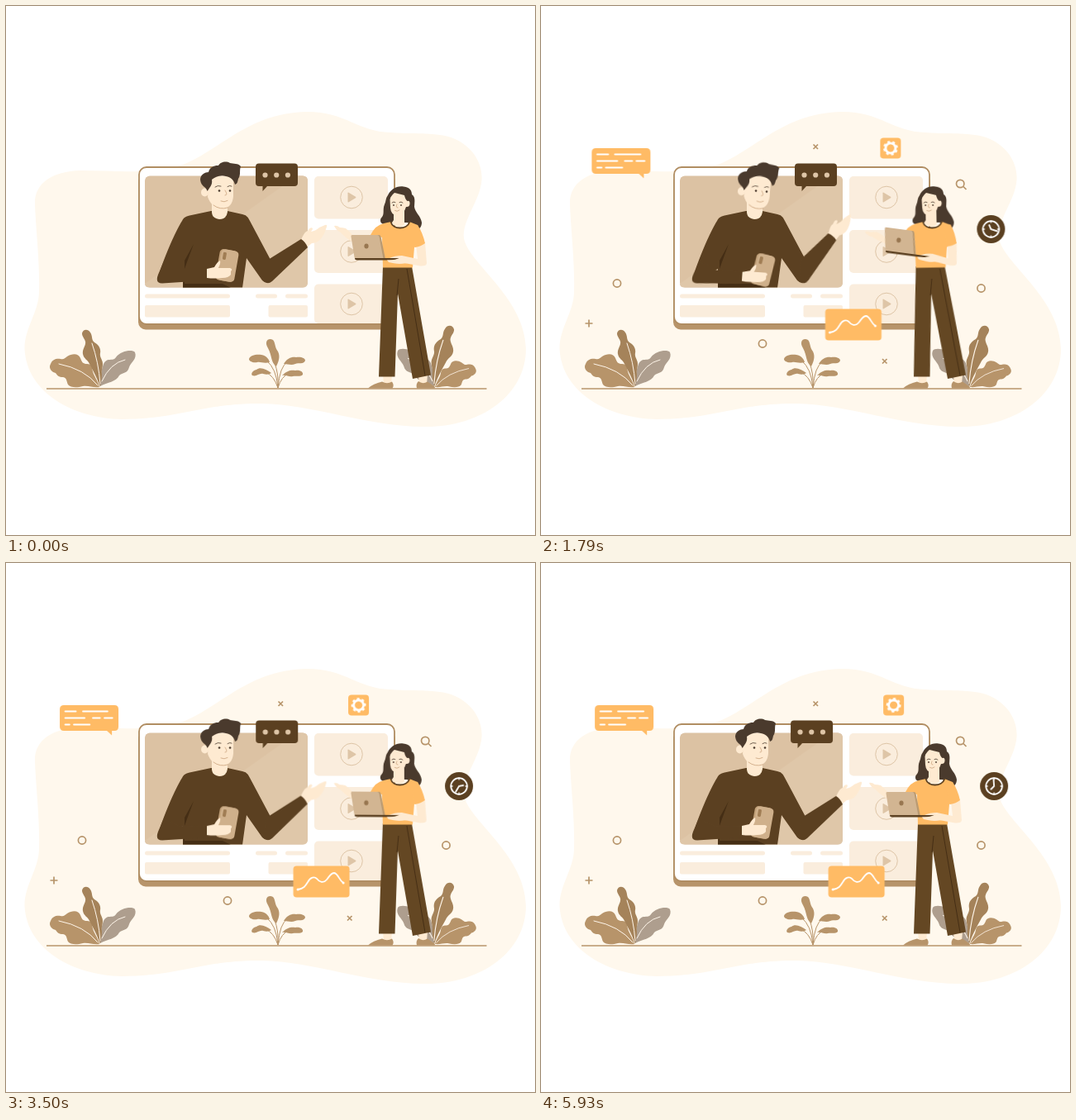
Animation of 640x640 px, one loop 6 s. Source, as an HTML page without scripts:

```html
<!DOCTYPE html>
<html lang="en">
<head>
<meta charset="utf-8">
<title>Video call</title>
<style>
html, body { margin: 0; width: 100%; height: 100%; overflow: hidden; background: #fff; }
svg { display: block; width: 100vw; height: 100vh; }

.dark { fill: #5b4021; }
.shade { fill: #452e15; }
.tan { fill: #b7946a; }
.brown { fill: #a5835a; }
.grey { fill: #ae9e8e; }
.sand { fill: #dec5a7; }
.pale { fill: #faeddd; }
.skin { fill: #feead1; }
.hair { fill: #4a3a2d; }
.orange { fill: #ffbb65; }
.line { fill: none; stroke: #b7946a; stroke-width: 1.7; }
.white { fill: none; stroke: #fff; stroke-width: 1.8; stroke-linecap: round; stroke-linejoin: round; }
.vein { fill: none; stroke: #fff6ea; stroke-width: 1; stroke-linecap: round; }
.face { fill: none; stroke: #4a3a2d; stroke-width: .8; stroke-linecap: round; }
.blush { fill: none; stroke: #c9a27d; stroke-width: .8; stroke-linecap: round; }

/* both people lean towards --to and back, twice a loop */
.sway { animation: sway 6s cubic-bezier(.37,0,.63,1) infinite; }
@keyframes sway {
  0%, 52.5%, 55%, 100% { transform: none; }
  25%, 29%, 79% { transform: var(--to); }
}
.head { --to: rotate(4.5deg); transform-origin: 258px 250px; }
.talk { --to: translate(5px, 0); }
.wave { --to: rotate(-11.5deg); transform-origin: 318px 326px; }
.hold { --to: rotate(4deg); transform-origin: 190px 330px; }
.legs { --to: skewX(1.07deg); transform-origin: 475px 450px; }
.bust { --to: translate(-2.5px, 0) rotate(-1deg); transform-origin: 473px 316px; }
.arm { --to: rotate(5.5deg); transform-origin: 500px 275px; }
.laptop { --to: rotate(3deg); transform-origin: 470px 306px; }
.point { --to: rotate(-12deg); transform-origin: 425px 279px; }

.float { animation: float 1.2s cubic-bezier(.37,0,.63,1) infinite alternate; }
@keyframes float {
  from { transform: translate(-3.6px, 0); }
  to { transform: translate(4.2px, 0); }
}
.pop { transform-box: fill-box; transform-origin: center; animation: pop 6s ease-in-out infinite; }
@keyframes pop {
  0% { transform: scale(0); }
  5.8% { transform: scale(1.2); }
  9.5%, 100% { transform: scale(1); }
}
.spin { animation: spin 6s linear infinite; }
@keyframes spin { to { transform: rotate(360deg); } }
.gear { transform-origin: 422.5px 172px; }
.hands { transform-origin: 544px 270px; }

.type path { stroke-dasharray: 1 3; animation: type 6s cubic-bezier(.37,0,.63,1) infinite; }
@keyframes type {
  0%, 8.3%, 44.01%, 47%, 82.01%, 84.6% { stroke-dashoffset: 1; opacity: 0; }
  8.31%, 47.01%, 84.61% { stroke-dashoffset: 1; opacity: 1; }
  21.5%, 44%, 60%, 82%, 97%, 100% { stroke-dashoffset: 0; opacity: 1; }
}
</style>
</head>
<body>
<svg viewBox="0 0 640 640">
<defs>
  <clipPath id="view"><path d="M160 150H420V340.500H160Z"/></clipPath>
  <g id="play">
    <circle r="13.3" fill="none" stroke="#dec5a7"/>
    <path class="sand" d="M-4.5-5.2Q-4.5-6.4-3.4-5.8L5-.8Q6 0 5 .8L-3.4 5.8Q-4.5 6.4-4.5 5.2Z"/>
  </g>
  <!-- leaves grow from 0,0 -->
  <g id="tall">
    <path class="brown" d="M1 0C-4-14-9-22-12-28C-14-33-19-34-20-40C-21-46-16-50-17-55C-18-59-21-61-21-65C-20-70-14-71-11-66C-8-62-10-57-6-54C-1-51 2-47 1-41C0-36 4-33 4-28C4-23 2-20 3-15C3-9 1-5 1 0Z"/>
    <path class="vein" d="M-9-53Q-1-30 1-4"/>
  </g>
  <g id="wide">
    <path class="tan" d="M0 0C-8 1-13-2-20-1C-27 1-35 1-38-3C-40-7-39-11-44-12C-49-12-51-14-53-17C-58-18-62-23-59-28C-57-34-51-35-47-34C-43-33-42-35-39-37C-33-41-25-41-23-35C-21-30-20-28-15-28C-9-28-9-23-8-19C-7-14-2-8 0 0Z"/>
    <path class="vein" d="M-49-28Q-18-22-2-2"/>
  </g>
  <g id="back">
    <path class="grey" d="M0 0C-1-11 2-21 4-27C9-36 15-29 19-35C25-43 39-45 42-41C45-33 37-29 35-23C33-15 27-17 23-13C19-5 9-5 0 0Z"/>
    <path class="vein" d="M2-6Q12-28 30-32"/>
  </g>
</defs>

<path fill="#fff8ed" d="M35 240C34 215 55 200 90 199C130 199 165 203 200 196C250 186 285 130 362 128C410 127 425 152 465 153C490 155 500 153 525 156C555 159 580 185 575 215C571 240 548 265 555 285C565 315 628 355 629 415C629 470 575 510 505 509C440 509 370 482 310 481C240 480 210 500 140 500C82 499 25 468 22.500 415C22 390 40 370 40 345C41 310 36 270 35 240Z"/>

<!-- screen -->
<rect class="tan" x="160" y="204" width="311" height="187.500" rx="9"/>
<rect x="161" y="195" width="309" height="190" rx="9" fill="#fff" stroke="#b08d62" stroke-width="1.800"/>
<rect x="168" y="205.500" width="197" height="135" rx="6" fill="#dcc2a3"/>
<path fill="#dfc7a9" d="M352 205.500H359Q365 205.500 365 211.500V334.500Q365 340.500 359 340.500H174Q168 340.500 168 336Z"/>
<g class="pale">
  <rect x="373" y="206" width="89" height="51.500" rx="5"/>
  <rect x="373" y="271" width="89" height="52" rx="5"/>
  <rect x="373" y="336.500" width="89" height="47.500" rx="5"/>
  <rect x="168" y="348.500" width="103" height="5" rx="2.500"/>
  <rect x="302" y="348.500" width="26" height="5" rx="2.500"/>
  <rect x="338" y="348.500" width="27" height="5" rx="2.500"/>
  <rect x="168" y="362" width="103" height="14.500" rx="2"/>
  <rect x="317.500" y="362" width="47.500" height="14.500" rx="2"/>
</g>
<use href="#play" x="418" y="231.500"/>
<use href="#play" x="418" y="297"/>
<use href="#play" x="418" y="360.500"/>

<!-- man -->
<g clip-path="url(#view)">
  <path class="dark" d="M213 260Q215 255 222 253.500L248 248H268L286 252Q292 253 294.500 259L319.500 306L322 332Q316 338 310 332L291 305L286 341H214V318L206 322L184 328C189 310 205 272 213 260Z"/>
  <path class="shade" d="M227 288L216 318L214 341H272L262 336H216V308Z"/>
  <path class="skin" d="M249 236H268V249Q267 258 258 258Q249 257 249 249Z"/>
  <g class="sway wave">
    <path class="skin" d="M357 283C360 276 362 273 365 272C367 268 371 267 371 270L369 273Q375 272 379 268L386 265Q389 264 388 267L386 273C382 282 377 287 370 287L364 292Z"/>
    <path class="dark" d="M317 307L357 282Q362 285 365 292L322 333Q316 338 311 332Z"/>
  </g>
  <g class="sway hold">
    <path class="dark" d="M191 309L184 325Q180 335.500 189 335.500L243 332V317L212 318Z"/>
    <rect x="256" y="295" width="21.500" height="38" rx="4.500" fill="#c3a27a" transform="rotate(10 267 314)"/>
    <rect x="258" y="295" width="21" height="38" rx="4.500" fill="#cfb08b" transform="rotate(10 268 314)"/>
    <rect x="262.500" y="298" width="4" height="9" rx="1.500" fill="#a07d54" transform="rotate(10 265 302)"/>
    <path class="skin" d="M243 318L252 316Q256 309 259 308Q260 311 257 317L271 317Q275 318 272 321L272 325Q269 329 262 329Q252 330 243 329Z"/>
  </g>
</g>
<g class="sway head">
  <ellipse class="skin" cx="240.500" cy="225.500" rx="4.500" ry="5"/>
  <path class="skin" d="M246 206L244 231Q249 245 262 245Q274 244 275 230V206Z"/>
  <path class="hair" d="M243.500 224C242 218 236 219 235 210C235 204 241 201 245 201C246 195 253 192.500 257 193C259 189 266 187 271 190C275 191 281 190 284 194C282 199 284.500 204 281 209C280 213 280 215 277 216C276 211 272 207 266 206C259 204 253 207 249 210C250 216 247 219 243.500 224Z"/>
  <path class="face" d="M253 219Q256 216.500 260 218M268 218.500Q271 216.500 273 218"/>
  <path class="blush" d="M265 223Q269 229 265 229M251 241Q259 247 268 244M260 236Q264 238 268 235.500"/>
  <circle cx="258" cy="223.500" r="1.300" class="hair"/>
  <circle cx="271" cy="223.500" r="1.300" class="hair"/>
</g>
<g class="sway talk">
  <path class="dark" d="M306 190.500H349Q353 190.500 353 194.500V214Q353 218 349 218H316L310.500 224V218H306Q302 218 302 214V194.500Q302 190.500 306 190.500Z"/>
  <path fill="none" stroke="#dec5a7" stroke-width="6.200" stroke-linecap="round" d="M313.500 204.500h.01m13.700 0h.01m13.700 0h.01"/>
</g>

<!-- plants -->
<use href="#back" transform="translate(114 460)"/>
<use href="#wide" transform="translate(113 461)"/>
<use href="#tall" transform="translate(113 461)"/>
<use href="#back" transform="translate(518 460) scale(-1.05 1.05)"/>
<use href="#tall" transform="translate(519 461) scale(-1.1 1.07)"/>
<use href="#wide" transform="translate(519 461) scale(-.83 .8)"/>
<path class="line" style="stroke-width:1" d="M329 462Q330 445 325 432M329 462Q327 438 315 429M329 462Q324 447 314 443M329 462Q331 436 341 430M329 462Q333 448 343 444"/>
<g class="tan">
  <path d="M327 436C320 431 322 423 317 414C312 406 317 401 323 404C326 407 325 413 329 418C332 424 330 430 327 436Z"/>
  <path d="M319 431C312 433 308 430 304 431C299 432 294 430 294 427C295 422 304 421 309 422C315 423 318 427 319 431Z"/>
  <path d="M321 444C315 440 308 436 303 440C298 441 296 445 298 447C303 449 306 444 311 445C315 446 318 446 321 444Z"/>
  <path d="M336 433C340 426 346 424 351 425C357 424 362 426 362 429C360 434 354 431 350 433C345 435 341 433 336 433Z"/>
  <path d="M334 447C340 441 345 440 350 441C356 440 360 443 359 446C356 449 351 447 347 448C342 449 339 446 334 447Z"/>
</g>
<path class="line" d="M49 463H581.500"/>

<!-- woman -->
<path class="skin" d="M456 446H467L466 458H457ZM499 446H510L509 458H500Z"/>
<path class="tan" d="M438 462.500Q444 457 455 454.500Q461 458 467 454.500Q470 459 467.500 462.500ZM497 462.500Q495.500 457 499 454Q504 458 510 454.500L518 460Q520 462 518 462.500Z"/>
<g class="sway legs">
  <path fill="#644723" d="M456 315H491L514 446.500L492 451L474 348L470.500 448.500H451Z"/>
  <path fill="none" stroke="#452e15" stroke-width="1" d="M473 350L475 330M485 318L507 447"/>
</g>
<g class="sway bust">
  <path class="hair" d="M462 229C465 222 473 217 481 218.500C489 219 491 224 491 228C496 231 494 238 494 243C495 250 502 254 503 262C503 269 497 273 494 269L486 262H466C458 267 451 263 453.500 257C459 252 455 247 458 240C460 236 459 233 462 229Z"/>
  <path class="sway point skin" d="M397 266Q400 265 404 268Q407 268 411 269Q416 273 421 279L418 285Q408 278 405 274Q399 271 397 266Z"/>
  <path class="skin" d="M469 248H482V261Q484 266 476 267Q468 266 467 262L469 259Z"/>
  <path class="skin" d="M464.500 234Q466 224 474 223Q483 224 485 235A3.500 3.500 0 1 1 484 243Q481 253 474 254Q465.500 253 465 244Z"/>
  <path class="hair" d="M463 237Q461 226 470 222Q486 219 489 235L485.500 236Q483 234 482 229Q474 227 470 226Q465 230 463 237Z"/>
  <path class="face" d="M467 238Q469 236 471 237.500M476 237.500Q478 236 480 238"/>
  <path class="blush" d="M473 240Q471 244 474 244M470.500 247.500Q473 249.500 476 247"/>
  <circle class="hair" cx="469" cy="241" r=".9"/>
  <circle class="hair" cx="478" cy="241" r=".9"/>
  <path class="orange" d="M466 261C468 271 485 271 488 261L498 265Q502 274 503 288L494 292L492 316.500H456L455 280L441 277Q447 265 457 263Z"/>
  <path fill="none" stroke="#5b4021" stroke-width="1.800" d="M465.500 261C468 271 485 271 488.500 261"/>
  <g class="sway arm">
    <path class="skin" d="M496 288L507 286L509 311Q509 315 501 314.500L482 311Q473 313 463 309Q459 306 464 305Q470 302 479 302L498 306Z"/>
    <path class="orange" d="M490 267L498 265Q504 274 507 287Q502 291 495 292Z"/>
    <g class="sway laptop">
      <path fill="#b99970" d="M421 277H451Q453 277 453.500 279L459 306H426Z"/>
      <path fill="#d2b592" d="M419 277H449Q451 277 451.500 279L456.500 306H424Q422 306 421.500 304L417.500 279Q417 277 419 277Z"/>
      <ellipse cx="436" cy="290.500" rx="2.600" ry="3" fill="#987650"/>
      <path class="dark" d="M422 305H478Q475 307.500 470 307.500H425Q422 307.500 422 305Z"/>
    </g>
    <path class="skin" d="M461 307.500Q470 308 478 304L488 306L486 311Q473 313 463 310Z"/>
  </g>
</g>

<!-- small marks -->
<g class="line">
  <path class="pop" d="M329.500 167.500l5.500 5.500m0-5.500l-5.500 5.500"/>
  <path class="pop" d="M413 427l5.500 5.500m0-5.500l-5.500 5.500"/>
  <path class="pop" d="M53.500 384h9m-4.500-4.500v9"/>
  <circle class="pop" cx="92" cy="335.500" r="4.600"/>
  <circle class="pop" cx="268" cy="408.500" r="4.600"/>
  <circle class="pop" cx="532.500" cy="341.500" r="4.600"/>
  <path class="pop" d="M511 218.500l3.500 3.500M502.500 215a4.700 4.700 0 1 0 9.400 0a4.700 4.700 0 1 0-9.400 0"/>
</g>

<!-- floating cards -->
<g class="float">
  <g class="pop">
    <path class="orange" d="M66 172H127Q132 172 132 177V198Q132 203 127 203H124V208.500L118 203H66Q61 203 61 198V177Q61 172 66 172Z"/>
    <g class="white type">
      <path pathLength="1" d="M67.500 179.500H81"/>
      <path pathLength="1" d="M89 179.500H120"/>
      <path pathLength="1" d="M67.500 187.500H92"/>
      <path pathLength="1" d="M101 187.500H110"/>
      <path pathLength="1" d="M115 187.500H125"/>
      <path pathLength="1" d="M67.500 195.500H73"/>
      <path pathLength="1" d="M78 195.500H98"/>
    </g>
  </g>
  <g class="pop">
    <rect class="orange" x="410" y="159.500" width="25" height="25" rx="4"/>
    <g class="spin gear" fill="none" stroke="#fff">
      <circle cx="422.500" cy="172" r="6" stroke-width="2.800"/>
      <circle cx="422.500" cy="172" r="7.900" stroke-width="2" pathLength="16" stroke-dasharray="1 1"/>
    </g>
  </g>
  <g class="pop">
    <rect class="orange" x="343.500" y="366.500" width="68" height="38" rx="4"/>
    <path class="white" d="M349 395C356 394 358 391 361 386C364 380 369 379 372 382C375 386 380 388 384 383C388 378 389 375 393 375C398 376 399 384 404 387"/>
    <path class="white" style="stroke-width:3" d="M349 395h.01M404 387h.01"/>
  </g>
  <g class="pop">
    <circle class="dark" cx="544" cy="270" r="17"/>
    <circle class="white" cx="544" cy="270" r="9.800"/>
    <path class="white" style="stroke-width:1.300" d="M544 260v2M544 278v2M534 270h2M552 270h2"/>
    <path class="white spin hands" d="M544 262V270L540 273.500"/>
  </g>
</g>
</svg>
</body>
</html>
```
